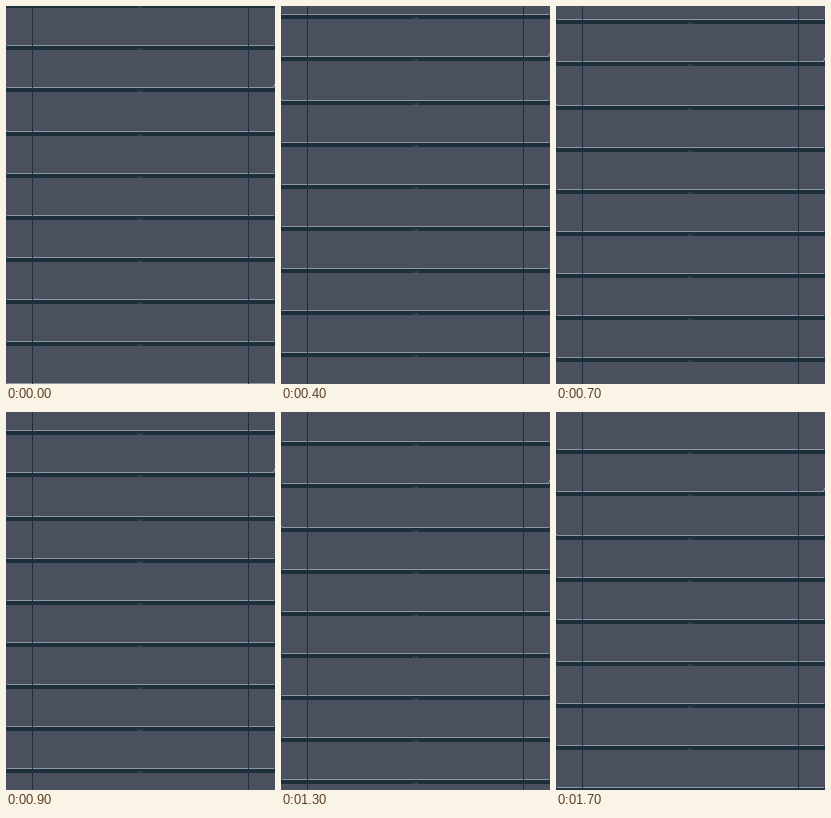
An HTML page with a canvas for the animation above (1.8 s loop, 269x378 px).

```html
<!DOCTYPE html>
<html lang="en">
<head>
<meta charset="utf-8">
<title>Scrolling panels</title>
<style>
  html, body { margin: 0; width: 100%; height: 100%; overflow: hidden; background: #4a505d; }
  canvas { display: block; width: 269px; height: 378px; }
</style>
</head>
<body>
<canvas id="stage" width="269" height="378"></canvas>
<script>
const W = 269, H = 378, STEP = 100, STEPS = 18, PITCH = 42;
const FILL = '#4a505d', DARK = '#1d2f3b', LIGHT = '#8f98a1', MARK = '#4a5661';
const ctx = document.getElementById('stage').getContext('2d');

// Scroll path: [step, distance], linear between points
const PATH = [[0, 0], [2, 7], [5, 13], [6, 14], [9, 21], [11, 25], [12, 28], [13, 32], [STEPS, PITCH]];

function offsetAt(step) {
  const i = PATH.findIndex(([s]) => s >= step);
  const [s0, d0] = PATH[i - 1], [s1, d1] = PATH[i];
  return Math.round(d0 + (d1 - d0) * (step - s0) / (s1 - s0));
}

function box(color, x, y, w, h) {
  ctx.fillStyle = color;
  ctx.fillRect(x, y, w, h);
}

function seam(y, row) {
  box(LIGHT, 1, y, W - 2, 1);
  box(DARK, 0, y + 1, W, 4);

  // Small downward chevron
  for (let dx = -2; dx <= 2; dx++) box(MARK, 134 + dx, y + 5 - Math.abs(dx), 1, 1);

  // The taller panel has turned-up corners
  if (row === 1) {
    box(LIGHT, W - 2, y - 1, 1, 1);
    box(LIGHT, W - 1, y - 3, 1, 2);
  }
  if (row === 2) box(LIGHT, 0, y - 1, 1, 1);
}

function draw(time) {
  const step = Math.floor(time / STEP) % STEPS;
  const offset = offsetAt(step || STEPS);
  box(FILL, 0, 0, W, H);
  for (let row = -1; row < 10; row++) {
    seam(row * PITCH - 3 + (row > 1 ? 2 : 0) + offset, row);
  }
  box(DARK, 26, 0, 1, H);
  box(DARK, 242, 0, 1, H);
}

const start = performance.now();
function tick() {
  draw(performance.now() - start);
  requestAnimationFrame(tick);
}
tick();
</script>
</body>
</html>
```
